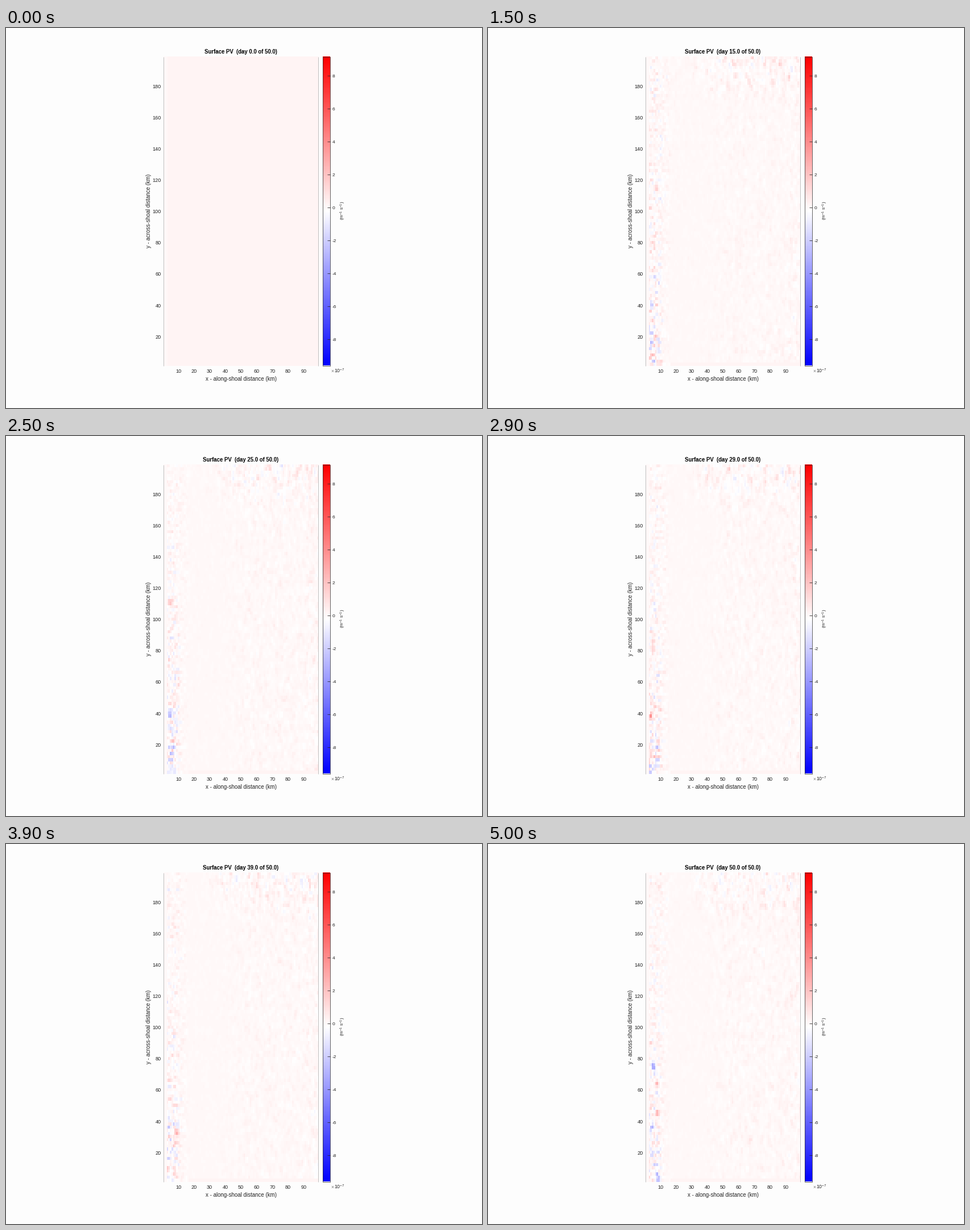
These frames come from a looping animation (837 px wide and 669 px high, 5100 ms). A matplotlib script:

```python
import numpy as np
import matplotlib.pyplot as plt
from matplotlib.animation import FuncAnimation
from matplotlib.patches import Rectangle

W, H, DPI = 837, 669, 64
DAYS = 51
VMIN, VMAX = -9.62, 9.15
LEFT, RIGHT, TOP, BOTTOM = 277, 549.5, 50.5, 595
INK = "#262626"

plt.rcParams["font.family"] = "Liberation Sans"
plt.rcParams["mathtext.default"] = "regular"

X, Y = np.meshgrid(np.arange(1, 100), np.arange(198, 1, -2))

# The strongest eddies: day of peak, x km, y km, peak value
STRONG = [(9, 4.3, 45, -5), (21, 4.5, 11, -4), (29, 4, 38, 4.5),
          (36, 4, 18, -9), (43, 5, 53, 5), (50, 5.5, 75, -5)]


def ramp(v, start, end):
    return np.clip((v - start) / (end - start), 0, 1)


def smear(a, axis):
    return (a + np.roll(a, 1, axis)) / np.sqrt(2)


def spread(day):
    """Standard deviation of the turbulence over the map."""
    coast = 0.75 * np.exp(-(np.abs(X - 5.5) / 4.5) ** 3 - Y / 75)
    shelf = 0.13 * (1 - ramp(X, 11, 18))
    top = 0.25 * ramp(Y, 168, 192) * ramp(X, 25, 42)
    east = 0.08 * ramp(X, 36, 55) * np.clip((day - 6) / 12, 0.2, 1)
    edge = 0.06 * ramp(X, 88, 96)
    early = np.exp(-((day - 8) / 6) ** 2)
    start = 0.14 * (1 - ramp(X, 20, 27)) * ramp(Y, 90, 115)
    corner = 0.18 * ramp(X, 60, 80) * (1 - ramp(Y, 24, 36))
    total = 0.025 + coast + shelf + top + east + edge + early * (start + corner)
    return total * ramp(day, 0, 6)


def random_eddies(rng, count):
    """Weaker eddies along the coast, denser towards low y."""
    return list(zip(rng.uniform(5, 53, count), rng.uniform(3.5, 9, count),
                    2 + rng.exponential(40, count),
                    rng.choice([-1, 1], count) * rng.uniform(1.5, 3, count)))


def add_eddies(field, day, eddies):
    for peak, x, y, value in eddies:
        age = day - peak
        if abs(age) < 4:
            shape = ((X - x) / 1.2) ** 2 + ((Y - y + 0.8 * age) / 2) ** 2
            field += value * np.exp(-shape - (age / 1.7) ** 2)


def make_fields():
    rng = np.random.default_rng(12)
    eddies = STRONG + random_eddies(rng, 50)
    initial = 0.2 * ramp(X, 1.5, 5)
    near_coast = 1 - ramp(X, 14, 20)
    noise = np.zeros(X.shape)
    fields = []
    for day in range(DAYS):
        noise = 0.6 * noise + 0.8 * rng.standard_normal(X.shape)
        wide = smear(noise, 1)
        texture = near_coast * wide + (1 - near_coast) * smear(wide, 0)
        texture = np.sign(texture) * np.abs(texture) ** 1.3
        # away from the coast the negative side is weaker
        texture *= np.where(texture < 0, 0.7 + 0.3 * near_coast, 1)
        field = initial * np.exp(-day / 3) + spread(day) * texture
        if day > 0:
            add_eddies(field, day, eddies)
        field[:, :2] = initial[:, :2]
        field[-1, 16:] = 0.2
        fields.append(field)
    return fields


fig = plt.figure(figsize=(W / DPI, H / DPI), dpi=DPI, facecolor="#fdfdfd")
ax = fig.add_axes([0, 0, 1, 1])
ax.axis("off")


def label(x, y, text, size, ha="center", va="baseline", color=INK, **kw):
    return ax.text(x, y, text, fontsize=size * 72 / DPI, ha=ha, va=va,
                   color=color, **kw)


def line(xs, ys, color, width=1):
    ax.plot(xs, ys, color=color, lw=width * 72 / DPI, solid_capstyle="butt")


def image(data, extent):
    return ax.imshow(data, cmap="bwr", vmin=VMIN, vmax=VMAX, extent=extent,
                     aspect="auto", interpolation="nearest")


fields = make_fields()
surface = image(fields[0], (LEFT, RIGHT, BOTTOM, TOP))
image(np.linspace(VMAX, VMIN, 256)[:, None], (557.5, 570.5, 594.5, 50.5))

for x in (277.5, 549.5):
    line([x, x], [TOP, BOTTOM], "#c0c0c0")
ax.add_patch(Rectangle((557.5, 50.5), 13, 544, fill=False, ec=INK,
                       lw=0.7 * 72 / DPI))

for km in range(10, 100, 10):
    label(275.6 + 2.751 * km, 607.4, str(km), 9.1)
for km in range(20, 200, 20):
    label(273, 601.9 - 2.757 * km, str(km), 9.1, ha="right")
for v in range(-8, 10, 2):
    y = 316 - 29 * v
    line([565, 570.5], [y, y], INK, 0.8)
    label(574, y + 3.2, str(v), 8.4, ha="left")

label(413.3, 620.8, "x - along-shoal distance (km)", 9.75)
label(250.7, 322.3, "y - across-shoal distance (km)", 9.75, va="center",
      rotation=90)
label(592.8, 321, "(m$^{-1}$ s$^{-1}$)", 8.1, va="center", rotation=90)
label(571.3, 607.4, "×", 8.6, ha="left", color="#777777")
label(577.3, 607.4, "10$^{-7}$", 8.6, ha="left")
title = label(413, 45, "", 9.6, weight="bold", color="black")

ax.set_xlim(0, W)
ax.set_ylim(H, 0)


def update(day):
    surface.set_data(fields[day])
    title.set_text(f"Surface PV  (day {day:.1f} of 50.0)")
    return surface, title


anim = FuncAnimation(fig, update, frames=DAYS, interval=100, repeat=True,
                     repeat_delay=0, blit=False)
plt.show()
```
